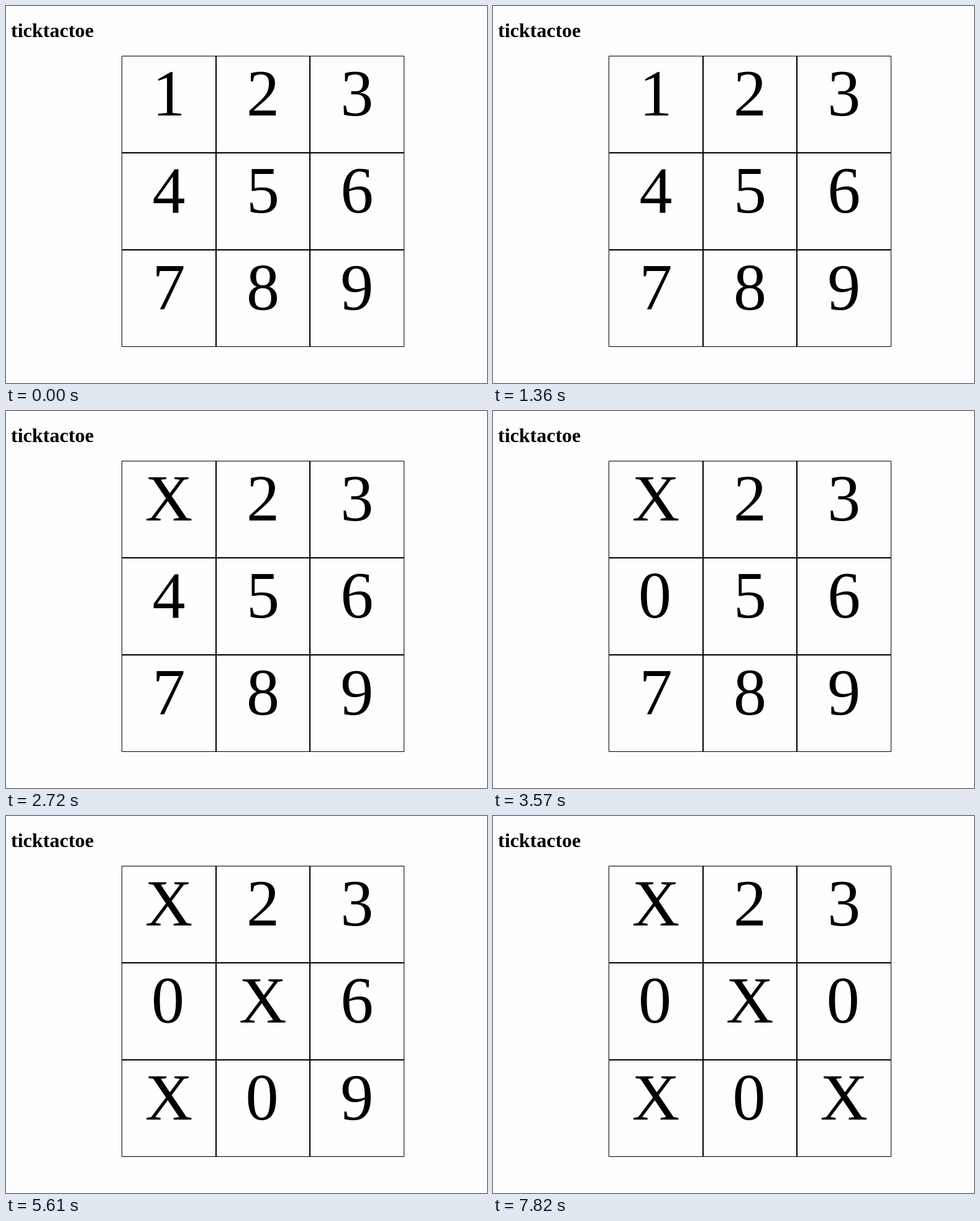
Write an HTML page that moves like this. It is 774 px wide and 606 px high and loops after 7.99 s.

```html
<!DOCTYPE html>
<html lang="en">
<head>
<meta charset="utf-8">
<title>ticktactoe</title>
<style>
  html, body { margin: 0; width: 100%; height: 100%; overflow: hidden; background: #fefefe; }
  svg { display: block; font-family: "Liberation Serif", Times, serif; }
  .title { font-size: 32px; font-weight: bold; }
  .cell { font-size: 106px; text-anchor: middle; }
</style>
</head>
<body>
<svg id="board" width="774" height="606" viewBox="0 0 774 606">
  <text class="title" x="8" y="50">ticktactoe</text>
  <path d="M186.5 80.5H640.5V547.5H186.5Z" fill="none" stroke="#000"/>
  <path d="M338 80V548M489 80V548M186 236H641M186 392H641" stroke="#000" stroke-width="2"/>
</svg>
<script>
  const LOOP = 7990, FIRST_MOVE = 2040, MOVE_GAP = 850;
  const moves = [1, 4, 7, 8, 5, 6, 9];
  const marks = ["X", "0", "X", "0", "X", "0", "X"];
  const board = document.getElementById("board");

  const cells = Array.from({ length: 9 }, (_, i) => {
    const cell = document.createElementNS("http://www.w3.org/2000/svg", "text");
    cell.setAttribute("class", "cell");
    cell.setAttribute("y", 175.5 + 156 * Math.floor(i / 3));
    return board.appendChild(cell);
  });

  function setCell(i, label) {
    const cell = cells[i];
    if (cell.textContent === label) return;
    cell.textContent = label;
    // The zero sits slightly left of the cell centre.
    cell.setAttribute("x", 262 + 151.4 * (i % 3) - (label === "0" ? 1.5 : 0));
  }

  function draw(now) {
    const time = now % LOOP;
    const played = Math.floor((time - FIRST_MOVE) / MOVE_GAP) + 1;
    for (let i = 0; i < 9; i++) {
      const turn = moves.indexOf(i + 1);
      setCell(i, turn >= 0 && turn < played ? marks[turn] : String(i + 1));
    }
    requestAnimationFrame(() => draw(performance.now()));
  }
  draw(0);
</script>
</body>
</html>
```
